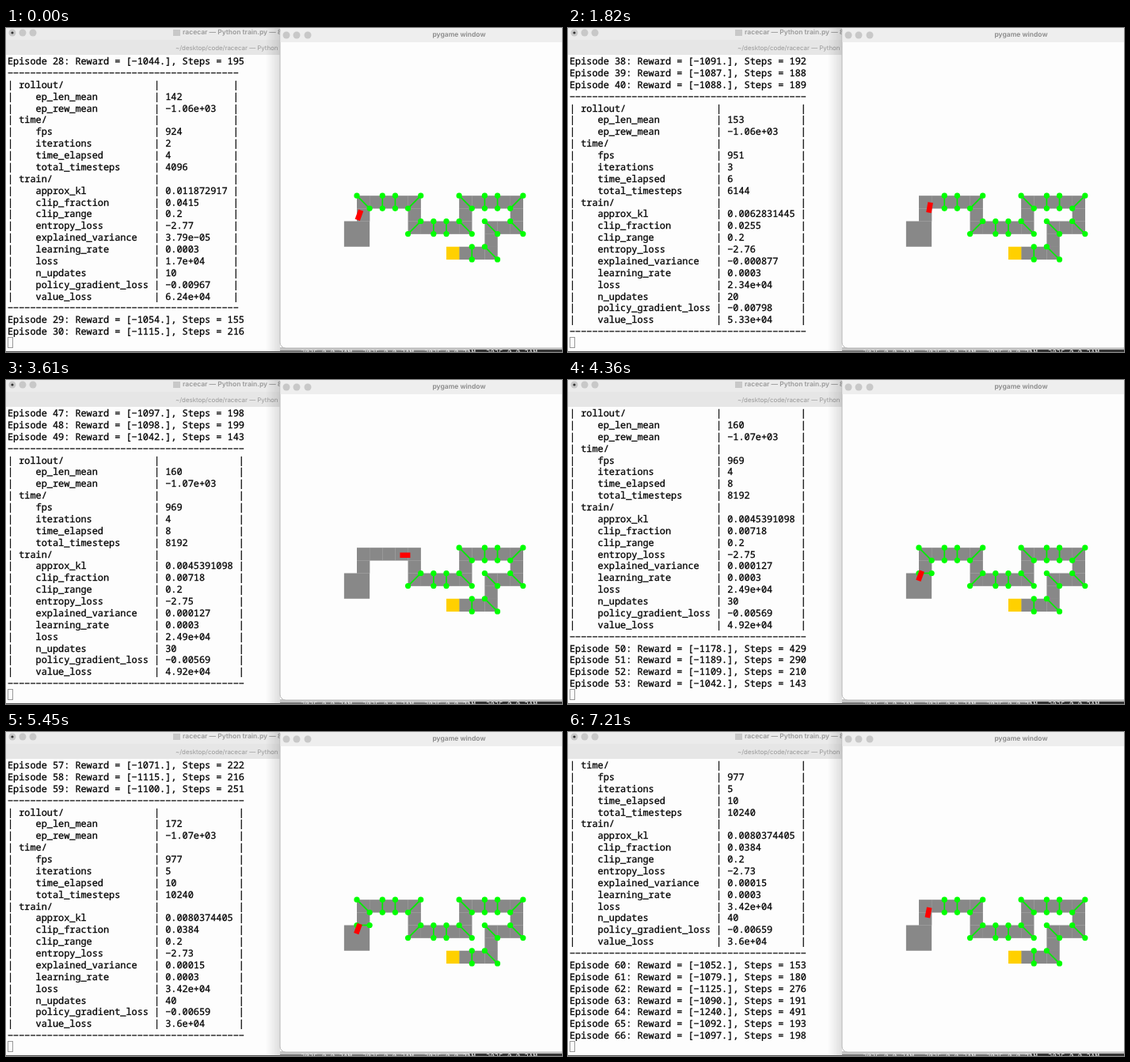
Animation of 702 by 410 pixels, one loop 7.24 s. Source, as an HTML page with a canvas:

```html
<!DOCTYPE html>
<html lang="en">
<head>
<meta charset="utf-8">
<title>Racecar training</title>
<style>
html, body { margin: 0; width: 100%; height: 100%; overflow: hidden; background: #fdfdfd; }
body { position: relative; text-rendering: geometricPrecision; }
body > * { position: absolute; margin: 0; white-space: pre; }
#bar { left: 0; top: 0; width: 702px; height: 34px; background: linear-gradient(#ebebeb 15px, #e6e6e6 15px); }
.label { font: 600 8.5px/12px Inter, sans-serif; color: #999; }
#log { left: 2px; top: 35px; font: 11.87px/14.87px "Noto Sans Mono", monospace; color: #000;
  -webkit-text-stroke: .3px #000; }
#cursor { left: 2px; top: 391px; width: 5px; height: 12px; border: 1px solid #999; }
canvas { left: 0; top: 0; }
#title { left: 472px; width: 200px; top: 3px; text-align: center; color: #888; }
</style>
</head>
<body>
<div id="bar"></div>
<div class="label" style="left:223px;top:0">racecar — Python train.py — 80×24</div>
<div class="label" style="left:214px;top:19px;font-size:7.9px;font-weight:400">~/desktop/code/racecar — Python train.py</div>
<pre id="log"></pre>
<div id="cursor"></div>
<canvas id="stage" width="702" height="410"></canvas>
<div id="title" class="label">pygame window</div>
<script>
const ctx = document.getElementById('stage').getContext('2d');
const logBox = document.getElementById('log');
const LOOP = 7240, ROLLOUT = 2048, PERIOD = 2000, UPDATE = 300;
const FIRST_REPORT = -565, FIRST_STEP = 120, FIRST_EPISODE = 28;

// Episode lengths; an episode takes two gates, one more per "+" and one less per "-".
const runs = `195+ 155 216 213 158 156 211 192+ 196 71- 192 188 189 211 187 224 236 189 153 198
  199 143 429+++ 290 210 143 206 203 205 222+ 216 251+ 153 180 276+ 191 491+++ 193 198 182`.split(/\s+/);

const labels = `rollout/, ep_len_mean, ep_rew_mean,time/, fps, iterations, time_elapsed, total_timesteps,train/,
 approx_kl, clip_fraction, clip_range, entropy_loss, explained_variance, learning_rate, loss, n_updates,
 policy_gradient_loss, value_loss`.replace(/\n/g, '').split(',');
const reports = [
  '142 -1.06e+03 924 0.011872917 0.0415 -2.77 3.79e-05 1.7e+04 -0.00967 6.24e+04',
  '153 -1.06e+03 951 0.0062831445 0.0255 -2.76 -0.000877 2.34e+04 -0.00798 5.33e+04',
  '160 -1.07e+03 969 0.0045391098 0.00718 -2.75 0.000127 2.49e+04 -0.00569 4.92e+04',
  '172 -1.07e+03 977 0.0080374405 0.0384 -2.73 0.00015 3.42e+04 -0.00659 3.6e+04'
].map(report);

function report(row, n) {
  const [len, rew, fps, kl, clip, entropy, variance, loss, policy, value] = row.split(' ');
  const cells = ['', len, rew, '', fps, n + 2, 2 * n + 4, ROLLOUT * (n + 2), '', kl, clip, 0.2,
    entropy, variance, 0.0003, loss, 10 * (n + 1), policy, value];
  const rule = '-'.repeat(30 + kl.length);
  const body = labels.map((label, i) =>
    `| ${label.replace(/^ /, '   ').padEnd(23)} | ${String(cells[i]).padEnd(kl.length)} |`);
  return [rule, ...body, rule];
}

// Log lines with the training step at which they appear.
const log = [], episodes = [];
let total = -parseInt(runs[0]), printed = 0;
runs.forEach((run, i) => {
  const steps = parseInt(run);
  const gates = 2 + run.split('+').length - run.split('-').length;
  episodes.push({ start: total, steps, gates });
  total += steps;
  const due = FIRST_STEP + ROLLOUT * printed;
  if (printed < reports.length && due < total)
    reports[printed++].forEach(text => log.push({ at: due, text }));
  const reward = steps + 999 - 50 * gates;
  log.push({ at: total, text: `Episode ${FIRST_EPISODE + i}: Reward = [-${reward}.], Steps = ${steps}` });
});

// Steps pause while the policy is updated after each report.
function stepAt(t) {
  const n = Math.floor((t - FIRST_REPORT) / PERIOD);
  const within = t - FIRST_REPORT - n * PERIOD - UPDATE;
  return FIRST_STEP + ROLLOUT * (n + Math.max(0, within) / (PERIOD - UPDATE));
}

// The track is a walk over unit cells from the start square.
const U = 16.14, gx = i => 443 + U * i, gy = j => 212.2 + U * j;
const moves = { U: [0, -1], R: [1, 0], D: [0, 1], L: [-1, 0] };
const walk = [...'UURRRRDDRRRRUURRRRDDLLDDLLL'].map(c => moves[c]);
const cells = [], gates = [];
let cx = 0.5, cy = 2.5;
walk.forEach((move, i) => {
  const [dx, dy] = move, next = walk[i + 1];
  cx += dx;
  cy += dy;
  cells.push([cx, cy]);
  if (!next) return;
  if (next !== move) {
    const ox = (dx - next[0]) / 2, oy = (dy - next[1]) / 2;
    gates.push([cx + ox, cy + oy, cx - ox, cy - oy]);
  } else if (i === 0 || walk[i - 1] === move) {
    const ex = cx - dx / 2, ey = cy - dy / 2;
    gates.push([ex + dy / 2, ey + dx / 2, ex - dy / 2, ey - dx / 2]);
  }
});

// Car position and tilt, one key point per gate.
const route = [[444, 253, 20], [446, 236, 20], [458, 226, 8], [474, 221, 90], [492, 221, 90],
  [509, 222, 90], [516, 238, 170]];

function pose(u) {
  const i = Math.floor(u), b = route[i + 1];
  return route[i].map((v, k) => v + (b[k] - v) * (u - i));
}

function rect(color, x, y, w, h) {
  ctx.fillStyle = color;
  ctx.fillRect(x, y, w, h);
}

function dot(x, y, r, color) {
  ctx.fillStyle = color;
  ctx.beginPath();
  ctx.arc(x, y, r, 0, 7);
  ctx.fill();
}

function drawDesktop() {
  rect('#555', 0, 409, 346, 1);
  rect('#c4c4c4', 346, 404, 356, 4);
  rect('#777', 346, 408, 356, 2);
  rect('#333', 585, 407, 117, 3);
  ctx.fillStyle = '#eee';
  ctx.font = '9px "Noto Sans Mono", monospace';
  for (let x = 372; x < 640; x += 78) ctx.fillText('2025-0-0 2AM', x, 414);
}

function drawWindow() {
  [8, 21, 34].forEach(x => dot(x, 6, 4.5, '#c8c8c8'));
  dot(8, 6, 1.6, '#333');
  rect('#c8c8c8', 211, 2, 9, 8);
  const shade = ctx.createLinearGradient(328, 0, 346, 0);
  shade.addColorStop(0, 'rgba(0,0,0,0)');
  shade.addColorStop(1, 'rgba(0,0,0,.12)');
  rect(shade, 328, 0, 18, 409);
  ctx.beginPath();
  ctx.roundRect(346, -1, 362, 406, 7);
  ctx.fillStyle = '#fdfdfd';
  ctx.fill();
  ctx.strokeStyle = '#b8b8b8';
  ctx.lineWidth = 1;
  ctx.stroke();
  rect('#eee', 346.5, 0, 356, 18);
  [354, 367, 381].forEach(x => dot(x, 9, 4.5, '#c8c8c8'));
}

function drawTrack(u, taken) {
  rect('#888', gx(-1), gy(2), 2 * U, 2 * U);
  cells.forEach(([x, y], i) =>
    rect(i < cells.length - 1 ? '#888' : '#ffd000', gx(x - .5), gy(y - .5), U + .2, U + .2));
  ctx.strokeStyle = '#0e0';
  ctx.lineWidth = 1.7;
  gates.slice(taken).forEach(([x1, y1, x2, y2]) => {
    ctx.beginPath();
    ctx.moveTo(gx(x1), gy(y1));
    ctx.lineTo(gx(x2), gy(y2));
    ctx.stroke();
    dot(gx(x1), gy(y1), 3.6, '#0f0');
    dot(gx(x2), gy(y2), 3.6, '#0f0');
  });
  const [x, y, tilt] = pose(u);
  ctx.save();
  ctx.translate(x, y);
  ctx.rotate(tilt * Math.PI / 180);
  rect('#f00', -3.3, -6.5, 6.6, 13);
  ctx.restore();
}

function draw(t) {
  const step = stepAt(t);
  const text = log.filter(l => l.at <= step).slice(-24).map(l => l.text).join('\n').replace(/-/g, '−');
  if (logBox.textContent !== text) logBox.textContent = text;
  const run = episodes.filter(e => e.start <= step).pop();
  const u = Math.min(1, (step - run.start) / run.steps) * (run.gates + .95);
  ctx.clearRect(0, 0, 702, 410);
  drawDesktop();
  drawWindow();
  drawTrack(u, Math.min(run.gates, Math.floor(u + .35)));
}

const began = performance.now();
function tick() {
  draw((performance.now() - began) % LOOP);
  requestAnimationFrame(tick);
}
tick();
</script>
</body>
</html>
```
